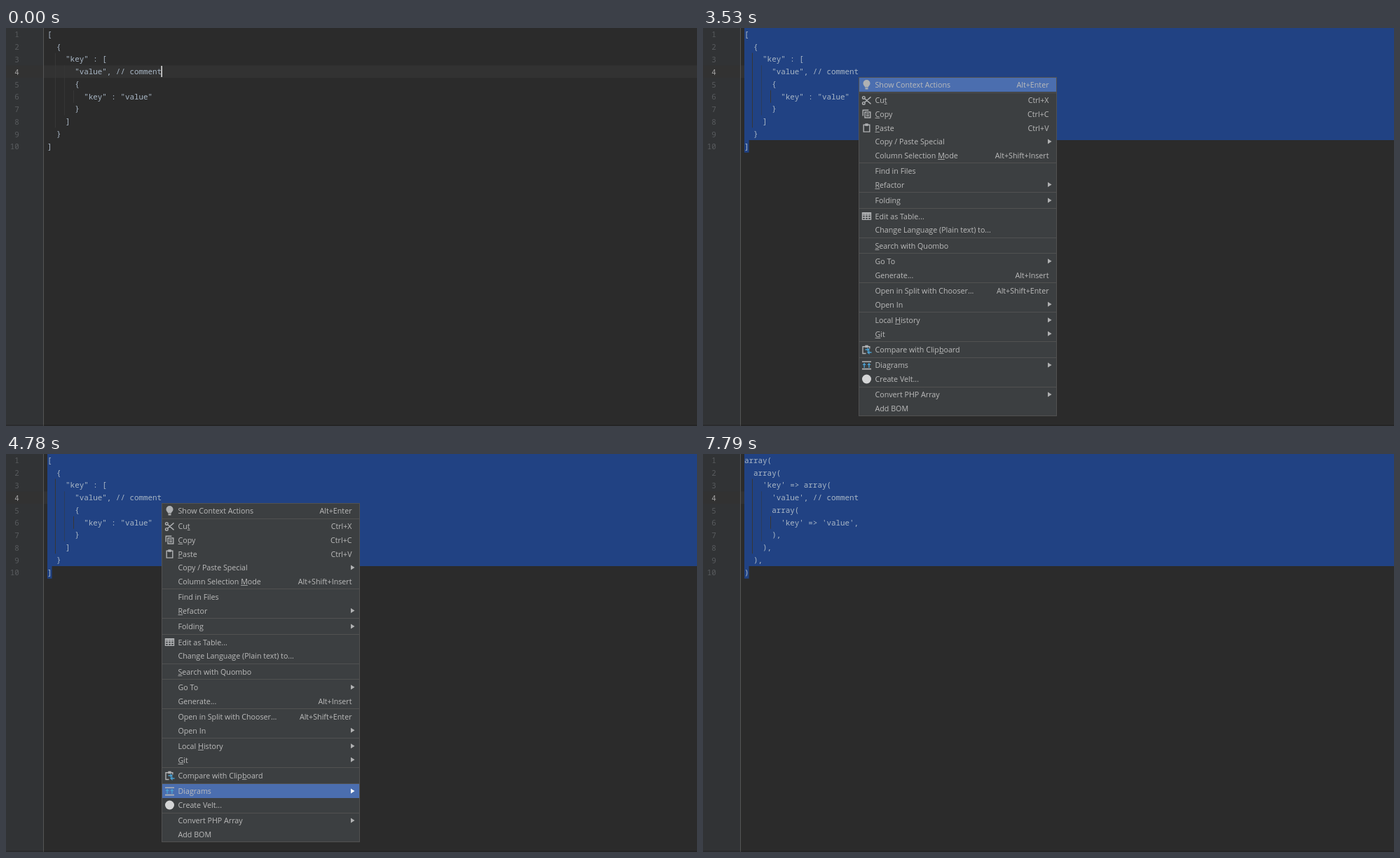
Recreate the animation shown at these times as an HTML page with a canvas. Size 986x568 px, loop 8000 ms.

```html
<!DOCTYPE html>
<html lang="en">
<head>
<meta charset="utf-8">
<title>Convert JSON to PHP array</title>
<style>
  html, body { margin: 0; height: 100%; overflow: hidden; background: #2b2b2b; }
  canvas { display: block; }
</style>
</head>
<body>
<canvas width="986" height="568"></canvas>
<script>
const ctx = document.querySelector('canvas').getContext('2d');
const LOOP = 8000, ROW = 17.78, CHAR = 6.53, LEFT = 59;
const MONO = '10.88px "Noto Sans Mono", "DejaVu Sans Mono", monospace';
const SANS = '10.7px "Open Sans", "Noto Sans", sans-serif';
const GRAY = '#afb1b3', BLUE = '#4a9fd0', HIGHLIGHT = '#4b6eaf';

const json = `[
  {
    "key" : [
      "value", // comment
      {
        "key" : "value"
      }
    ]
  }
]`.split('\n');

const php = `array(
  array(
    'key' => array(
      'value', // comment
      array(
        'key' => 'value',
      ),
    ),
  ),
)`.split('\n');

// Icon layers: [mode, colour, path], centred on 0,0
const clipboard = ['stroke', GRAY, 'M-4.3 -4.3H4.3V5.5H-4.3Z'];
const clip = ['fill', GRAY, 'M-2.2 -6.3H2.2V-2.8H-2.2Z'];
const icons = {
  bulb: [['fill', GRAY, 'M-5 -2A5 5 0 0 1 5 -2C5 1 2.5 1.5 2.5 3.5H-2.5C-2.5 1.5 -5 1 -5 -2ZM-2 4.3H2V6.5H-2Z']],
  cut: [['stroke', GRAY, 'M6 -5L-2.8 2.6M6 5L-2.8 -2.6M-2.4 -4A1.8 1.8 0 1 1 -6 -4A1.8 1.8 0 1 1 -2.4 -4M-2.4 4A1.8 1.8 0 1 1 -6 4A1.8 1.8 0 1 1 -2.4 4']],
  copy: [['stroke', GRAY, 'M-5.3 2.5V-5.8H2.8M-2.5 -3H5.3V5H-2.5ZM-.7 -.4H3.6M-.7 2.2H3.6']],
  paste: [clipboard, clip],
  table: [['stroke', GRAY, 'M-6 -4.8H6V4.8H-6ZM-6 -1.6H6M-6 1.6H6M-2 -4.8V4.8M2 -4.8V4.8'], ['fill', GRAY, 'M-6 -5H6V-3H-6Z']],
  compare: [['stroke', GRAY, 'M4.3 -1.5V-4.3H-5.5V5.5H-1'], clip,
    ['fill', BLUE, 'M-2 -.8H1V-3L4.5 0L1 3V.8H-2ZM7 3.2H4V1L.5 4L4 7V4.8H7Z']],
  diagram: [['fill', GRAY, 'M-6.5 -6H6.5V-4.4H-6.5ZM-6.5 4.4H6.5V6H-6.5Z'],
    ['fill', BLUE, 'M-3.4 -3.6L-.8 -.4H-2.7V3.6H-4.1V-.4H-6ZM3.4 -3.6L6 -.4H4.1V3.6H2.7V-.4H.8Z']],
  disc: [['fill', '#d4d5d6', 'M6.5 0A6.5 6.5 0 1 1 -6.5 0A6.5 6.5 0 1 1 6.5 0']],
};

// label (& marks the mnemonic) | shortcut, or > for a submenu | icon; '-' is a separator
const entries = `Show Context Actions|Alt+Enter|bulb
-
Cu&t|Ctrl+X|cut
&Copy|Ctrl+C|copy
&Paste|Ctrl+V|paste
Copy / Paste Special|>
Column Selection &Mode|Alt+Shift+Insert
-
Find in Files
&Refactor|>
-
Folding|>
-
Edit as Table...||table
Change Language (Plain text) to...
-
&Search with Quombo
-
Go To|>
Generate...|Alt+Insert
-
Open in Split with Chooser...|Alt+Shift+Enter
Open In|>
-
Local &History|>
&Git|>
-
Compare with Clip&board||compare
-
Diagrams|>|diagram
Create Velt...||disc
-
Convert PHP Array|>
Add BOM`.split('\n');

const items = [], separators = [];
let itemY = 81;
for (const entry of entries) {
  if (entry === '-') {
    separators.push(itemY - 8.4);
    itemY += 2.8;
  } else {
    const [label, extra, icon] = entry.split('|');
    items.push({ label, extra, icon, y: itemY });
    itemY += 19.6;
  }
}

// Item under the pointer every 70 ms; -1 while it rests on a separator
const hoverPath = [0, 1, 2, 3, 4, 5, 6, 7, 9, 10, 12, 13, 15, 16, 17, 18, -1, 19, 20];
const caretTimes = [[0, 270], [800, 1330], [1810, 2340], [2800, 3000], [6800, 7790]];

function rect(x, y, w, h, color) {
  ctx.fillStyle = color;
  ctx.fillRect(x, y, w, h);
}

function text(str, x, y, color, font, align = 'left') {
  ctx.font = font;
  ctx.textAlign = align;
  ctx.fillStyle = color;
  ctx.fillText(str, x, y);
}

function panel(x, y, w, h) {
  rect(x, y, w, h, '#515151');
  rect(x + 1, y + 1, w - 2, h - 2, '#3c3f41');
}

function menuLabel(label, x, y) {
  const at = label.indexOf('&'), plain = label.replace('&', '');
  text(plain, x, y + 4, '#bbbbbb', SANS);
  if (at < 0) return;
  const start = ctx.measureText(plain.slice(0, at)).width;
  rect(x + start, Math.round(y + 5), ctx.measureText(plain[at]).width, 1, '#a0a1a2');
}

function drawIcon(name, x, y) {
  ctx.save();
  ctx.translate(x, y);
  ctx.lineWidth = 1.4;
  for (const [mode, color, path] of icons[name]) {
    ctx[mode + 'Style'] = color;
    ctx[mode](new Path2D(path));
  }
  ctx.restore();
}

function drawEditor(t) {
  const selected = t >= 1530, converted = t >= 6800;
  rect(0, 0, 986, 568, '#2b2b2b');
  rect(0, 0, 53, 568, '#313335');
  rect(0, 3 * ROW, 986, ROW, '#323232');
  rect(53, 0, 1, 568, '#555555');
  rect(0, 566, 986, 2, 'rgba(0,0,0,.13)');
  if (selected) {
    rect(LEFT, 0, 986 - LEFT, 160, '#214283');
    rect(LEFT, 160, CHAR, ROW, '#214283');
  }
  if (!converted || t >= 7130) {
    rect(70, 2 * ROW, 1, 6 * ROW, '#373737');
    rect(83, 3 * ROW, 1, 4 * ROW, selected ? 'rgba(55,55,55,.5)' : '#353535');
    rect(96, 5 * ROW, 1, ROW, '#373737');
  }
  (converted ? php : json).forEach((line, i) => {
    const y = 12.8 + i * ROW;
    text(i + 1, 18.7, y + .6, i === 3 ? '#a4a3a3' : '#585b5e', MONO, 'right');
    text(line, LEFT, y, '#a9b7c6', MONO);
  });
  if (caretTimes.some(([from, to]) => t >= from && t < to)) rect(221.3, 54, 1.7, 16, '#d0d0d0');
}

function hoveredItem(t) {
  if (t < 3530) return -1;
  if (t >= 4920) return 21;
  return hoverPath[Math.min(Math.floor((t - 3530) / 70), hoverPath.length - 1)];
}

function drawMenu(t) {
  const hovered = hoveredItem(t);
  panel(222, 70, 283, 484);
  for (const y of separators) rect(223, Math.round(y - .5), 281, 1, '#515151');
  items.forEach(({ label, extra, icon, y }, i) => {
    if (i === hovered) rect(223, Math.round(y - 10), 281, 20, HIGHLIGHT);
    if (icon) drawIcon(icon, 233.5, y);
    menuLabel(label, 245.5, y);
    if (extra === '>') {
      ctx.fillStyle = i === hovered ? '#ffffff' : '#b0b1b2';
      ctx.fill(new Path2D(`M492 ${y - 3.8}L497.5 ${y - .3}L492 ${y + 3.2}Z`));
    } else if (extra) {
      text(extra, 493.5, y + 4, '#bbbbbb', SANS, 'right');
    }
  });
}

function drawSubmenu(t) {
  panel(500, 511, 134, 41);
  if (t >= 5720) rect(501, 512, 132, 20, HIGHLIGHT);
  menuLabel('JSON to PHP Array', 523.5, 522);
  menuLabel('PHP Array to JSON', 523.5, 541.6);
}

const start = performance.now();
function frame() {
  const t = (performance.now() - start) % LOOP;
  drawEditor(t);
  if (t >= 3000 && t < 6800) {
    drawMenu(t);
    if (t >= 5120) drawSubmenu(t);
  }
  requestAnimationFrame(frame);
}
frame();
</script>
</body>
</html>
```
